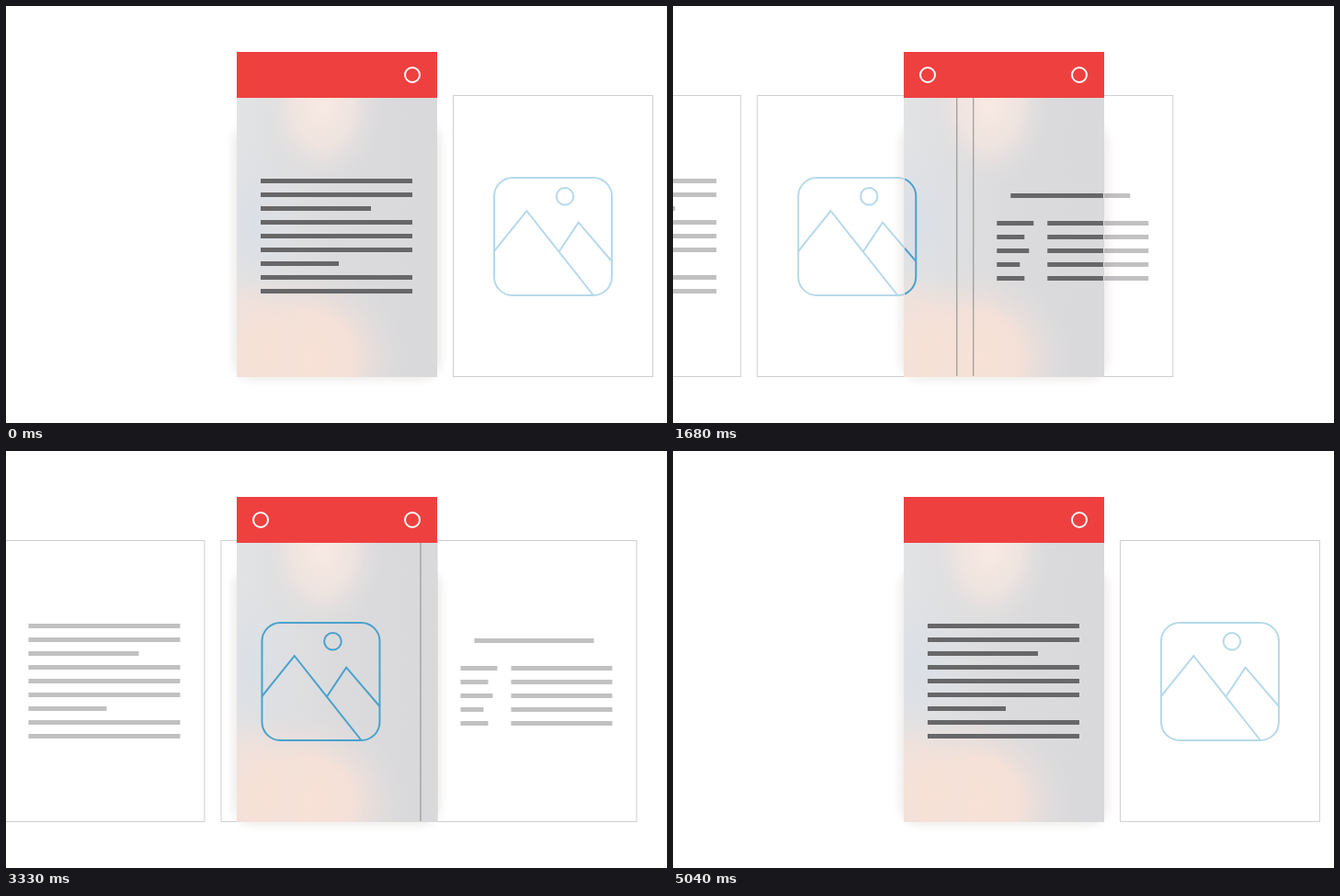
Recreate the animation shown at these times as an HTML page. Size 719 px wide and 454 px high, loop 5.13 s.

```html
<!DOCTYPE html>
<html lang="en">
<head>
<meta charset="utf-8">
<title>Swipe between pages</title>
<style>
  html, body { margin: 0; width: 100%; height: 100%; overflow: hidden; background: #fff; }
  svg { display: block; }
  .page { fill: none; stroke: #8a8a8a; }
  .bars { fill: #676669; }
  .picture { fill: none; stroke: #4aa1cc; stroke-width: 2; }
  .dot { fill: none; stroke: #fff; stroke-width: 2; }
</style>
</head>
<body>
<svg width="719" height="454" viewBox="0 0 719 454">
  <defs>
    <linearGradient id="base">
      <stop offset="0" stop-color="#e2e3e5"/>
      <stop offset=".5" stop-color="#dbdbdd"/>
      <stop offset="1" stop-color="#d9d9db"/>
    </linearGradient>
    <radialGradient id="peach">
      <stop offset="0" stop-color="#f9e2d6"/>
      <stop offset=".5" stop-color="#f7e1d7" stop-opacity=".9"/>
      <stop offset="1" stop-color="#e6dfdd" stop-opacity="0"/>
    </radialGradient>
    <radialGradient id="pink">
      <stop offset="0" stop-color="#f8e9e3"/>
      <stop offset=".5" stop-color="#f2e5e0" stop-opacity=".9"/>
      <stop offset="1" stop-color="#e2dfdf" stop-opacity="0"/>
    </radialGradient>
    <radialGradient id="blue">
      <stop offset="0" stop-color="#dbe0e7"/>
      <stop offset="1" stop-color="#dcdfe4" stop-opacity="0"/>
    </radialGradient>
    <filter id="blur" x="-20%" y="-20%" width="140%" height="140%"><feGaussianBlur stdDeviation="4"/></filter>
    <clipPath id="body"><rect x="251" y="100" width="218" height="304"/></clipPath>
    <clipPath id="screen"><rect x="252" y="100" width="216" height="303"/></clipPath>
    <g id="pages"></g>
  </defs>

  <rect x="246" y="125" width="228" height="283" rx="24" fill="#f1eeec" filter="url(#blur)"/>
  <use href="#pages" opacity=".4"/>

  <g clip-path="url(#body)">
    <rect x="251" y="100" width="218" height="304" fill="url(#base)"/>
    <ellipse cx="268" cy="235" rx="62" ry="90" fill="url(#blue)"/>
    <ellipse cx="344" cy="105" rx="66" ry="92" fill="url(#pink)"/>
    <ellipse cx="322" cy="382" rx="110" ry="98" fill="url(#peach)"/>
    <ellipse cx="260" cy="365" rx="70" ry="90" fill="url(#peach)" opacity=".6"/>
  </g>
  <g clip-path="url(#screen)"><use href="#pages"/></g>

  <rect x="251" y="50" width="218" height="50" fill="#ef4040"/>
  <circle id="back" class="dot" cx="277" cy="75" r="8"/>
  <circle class="dot" cx="442" cy="75" r="8"/>
</svg>
<script>
  const STEP = 235, LOOP = 5130, TICK = 30, SWIPE = 570;
  // start time, page left, page entered
  const swipes = [[450, 0, 1], [1500, 1, 2], [3000, 2, 1], [4500, 1, 0]];

  const bar = (x, y, width) => `<rect x="${x}" y="${y}" width="${width}" height="5"/>`;

  const article = [165, 165, 120, 165, 165, 165, 85, 165, 165]
    .map((width, i) => bar(26, 188 + 15 * i, width)).join('');
  const table = bar(41, 204, 130) + [40, 30, 35, 25, 30]
    .map((width, i) => bar(26, 234 + 15 * i, width) + bar(81, 234 + 15 * i, 110)).join('');
  const picture = `
    <rect x="45" y="187" width="128" height="128" rx="20"/>
    <circle cx="122" cy="207.3" r="9.3"/>
    <path d="M45 267 80.3 223 153 315M115.5 267.5 136.7 235.7 173 278"/>`;

  const pages = document.getElementById('pages');
  const back = document.getElementById('back');
  pages.innerHTML = [['bars', article], ['picture', picture], ['bars', table]]
    .map(([kind, content], i) => `<g transform="translate(${251 + STEP * i})">
      <rect class="page" x=".5" y="97.5" width="217" height="306"/>
      <g class="${kind}">${content}</g></g>`).join('');

  function positionAt(time) {
    let position = 0;
    for (const [start, from, to] of swipes) {
      if (time < start) break;
      const rest = 1 - Math.min((time - start) / SWIPE, 1);
      position = to + (from - to) * rest ** 3;
    }
    return position;
  }

  function draw() {
    const time = Math.floor(performance.now() % LOOP / TICK) * TICK;
    const position = positionAt(time);
    pages.setAttribute('transform', `translate(${-STEP * position})`);
    back.setAttribute('opacity', Math.min(position, 1));
    requestAnimationFrame(draw);
  }
  draw();
</script>
</body>
</html>
```
